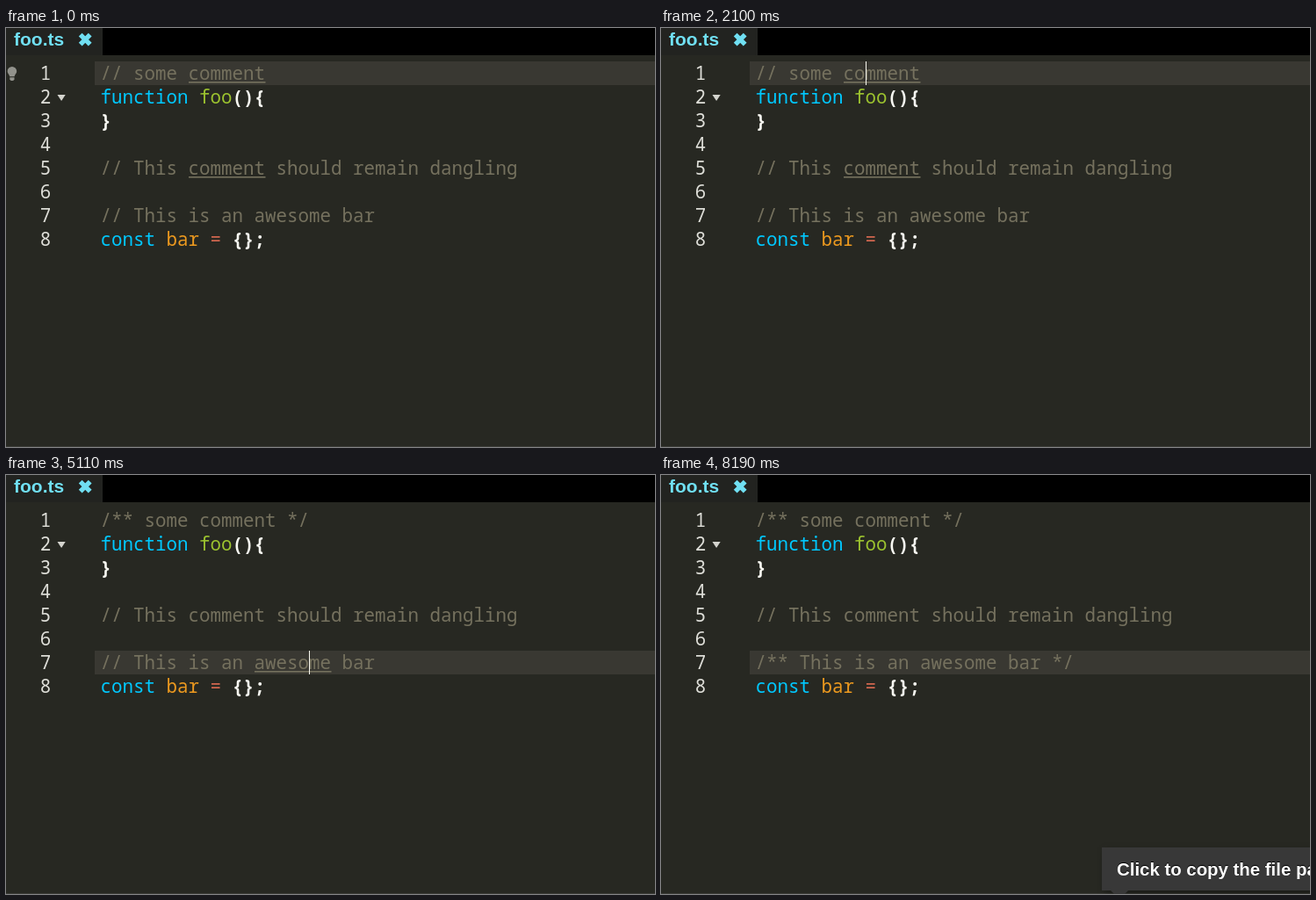
These frames come from a looping animation (739 by 477 pixels, 8.26 s). An HTML page:

```html
<!DOCTYPE html>
<html lang="en">
<head>
<meta charset="utf-8">
<title>Quick fix demo</title>
<style>
  html, body { margin: 0; width: 100%; height: 100%; overflow: hidden; background: #272822; }
  svg { display: block; width: 100%; height: 100%; }
  text { white-space: pre; }
  .mono { font: 20.83px "Noto Sans Mono", monospace; }
  .sans { font: 25.2px "Liberation Sans", Arial, sans-serif; }
</style>
</head>
<body>
<svg id="stage" viewBox="0 0 739 477"></svg>
<script>
const LOOP = 8260, TICK = 70;
const LEFT = 108, TOP = 38, ROW = 27, CHAR = 12.5;
const FIRST_EDIT = 2170, SECOND_EDIT = 5390;
const COLOR = {
  comment: '#75715e', keyword: '#00c8ff', name: '#9cc32f',
  plain: '#f8f8f2', variable: '#ec991f', operator: '#d0664f', tab: '#70dff2'
};

// Spans are [start, end) in milliseconds.
const modalSpans = [[1400, 2100], [4340, 5110]];
const unsavedSpans = [[FIRST_EDIT, 3920], [SECOND_EDIT, 7210]];
const caretSpans = [[70, 560], [1050, 1400], [2100, 2590], [2730, 3990],
                    [5110, 5880], [6300, 6790], [7280, 7770]];
const hoverSpan = [6580, 7420];

// [time, row, column]
const caretMoves = [[0, 1, 10], [FIRST_EDIT, 1, 19], [2730, 2, 15], [2870, 3, 1], [3010, 4, 0],
                    [3150, 5, 19], [3290, 6, 0], [3500, 7, 19], [SECOND_EDIT, 7, 29]];
// [start, end, row, column, length]
const underlines = [[0, FIRST_EDIT, 1, 8, 7], [0, FIRST_EDIT, 5, 8, 7],
                    [3220, 3360, 5, 16, 6], [3570, SECOND_EDIT, 7, 14, 7]];
// [start, end, row]
const bulbs = [[0, 2100, 1], [2170, 2310, 1], [3710, 5110, 7], [5390, 5600, 7]];

const within = (t, [start, end]) => t >= start && t < end;
const find = (t, spans) => spans.find(span => within(t, span));
const progress = (t, start, end) => Math.min(1, Math.max(0, (t - start) / (end - start)));
const ease = p => p * p * (3 - 2 * p);
const rowTop = row => TOP + (row - 1) * ROW;

const rect = (x, y, w, h, fill, extra = '') =>
  `<rect x="${x}" y="${y}" width="${w}" height="${h}" fill="${fill}" ${extra}/>`;
const label = (type, x, y, fill, content, style = '') =>
  `<text class="${type}" x="${x}" y="${y}" fill="${fill}" style="${style}">${content}</text>`;
const path = (d, attributes) => `<path d="${d}" ${attributes}/>`;

function bulb(x, y, scale, fill) {
  return `<g transform="translate(${x} ${y}) scale(${scale})" fill="${fill}">` +
    path('M5.5 0a5.3 5.3 0 0 1 5.3 5.3c0 2.6-2.3 3.6-2.6 6H2.8c-.3-2.4-2.6-3.4-2.6-6A5.3 5.3 0 0 1 5.5 0z', '') +
    path('M2.9 12.2h5.2v2.2L6.8 16H4.2L2.9 14.4z', '') + '</g>';
}

function codeLines(t) {
  const comment = (body, isBlock) => [['comment', isBlock ? `/** ${body} */` : `// ${body}`]];
  return [
    comment('some comment', t >= FIRST_EDIT),
    [['keyword', 'function '], ['name', 'foo'], ['plain', '(){']],
    [['plain', '}']],
    [],
    comment('This comment should remain dangling', false),
    [],
    comment('This is an awesome bar', t >= SECOND_EDIT),
    [['keyword', 'const '], ['variable', 'bar '], ['operator', '= '], ['plain', '{};']]
  ];
}

function tabBar(t) {
  const icon = find(t, unsavedSpans)
    ? `<circle cx="91" cy="12.5" r="9.5" fill="${COLOR.tab}"/>`
    : path('M84.7 7.6l11 11m0-11l-11 11', `stroke="${COLOR.tab}" stroke-width="5.4"`);
  return rect(0, 0, 739, 31, '#000') + rect(0, 0, 110, 31, '#222320') +
    label('sans', 9, 20, COLOR.tab, 'foo.ts', 'font-size:21px;font-weight:bold') + icon;
}

function editor(t) {
  const [, row, column] = caretMoves.findLast(([time]) => t >= time);
  let out = rect(0, 0, 739, 477, '#272822') + rect(0, 476, 739, 1, '#3a3b36') +
    rect(101, rowTop(row), 638, ROW, '#393832');

  codeLines(t).forEach((tokens, i) => {
    const baseline = rowTop(i + 1) + 21;
    const spans = tokens.map(([kind, content]) =>
      `<tspan fill="${COLOR[kind]}" font-weight="${kind === 'plain' ? 600 : 400}">${content}</tspan>`);
    out += label('mono', 38.7, baseline, '#deded8', i + 1, 'font-weight:500') +
      label('mono', LEFT - 0.5, baseline, COLOR.plain, spans.join(''));
  });
  out += path('M58.5 76h9.2l-4.6 7z', 'fill="#d4d4ce"');

  for (const mark of underlines) {
    if (!within(t, mark)) continue;
    const [, , markRow, start, length] = mark;
    out += rect(LEFT + start * CHAR, rowTop(markRow) + 23, length * CHAR, 1.6, COLOR.comment);
  }
  const hint = find(t, bulbs);
  if (hint) out += bulb(1.4, rowTop(hint[2]) + 6, 1, '#92928c');
  if (find(t, caretSpans)) out += rect(Math.floor(LEFT + column * CHAR), rowTop(row), 1, ROW, '#f8f8f0');
  return out + tabBar(t);
}

function keyCap(x, width, name) {
  return rect(x, 98.5, width, 36, '#111', 'rx="6.5" stroke="#808080" stroke-width="3"') +
    label('mono', x + 7.5, 125, '#858585', name, 'font-size:22.9px');
}

function modal(elapsed) {
  return rect(0, 0, 739, 477, '#fff', 'opacity=".75"') +
    rect(63, 67, 605, 383, '#323433', 'rx="6"') +
    keyCap(301.5, 59, 'Esc') + label('sans', 368.5, 125, '#808080', 'to exit') +
    keyCap(444.5, 86, 'Enter') + label('sans', 539, 125, '#808080', 'to select') +
    bulb(102.6, 146, 1.8, '#fff') +
    label('sans', 134, 169, '#fff', 'Quick Fixes', 'font-size:28px;font-weight:bold') +
    rect(98.5, 220.5, 534, 44, '#323433', 'stroke="#1b6792" stroke-width="6"') +
    rect(99, 221, 533, 43, 'none', 'stroke="#0797e4" stroke-width="4.4"') +
    label('sans', 104.5, 252, '#a2a2a2', 'Filter', 'font-size:28px') +
    (elapsed < 490 ? rect(105, 227, 1, 32, '#fff') : '') +
    rect(98, 272, 535, 55, '#555') +
    label('mono', 111.5, 307, '#fff', 'Convert comment to block', 'font-weight:600');
}

function hoverCard() {
  return rect(215.5, 169.5, 306, 67, '#343336', 'rx="4" stroke="#fff" stroke-width="3"') +
    label('mono', 228, 197, '#dcdcdc', 'const bar: {}', 'font-size:21.3px;font-weight:700') +
    label('mono', 228, 224, '#dcdcdc', 'This is an awesome bar', 'font-size:21.3px;font-style:italic');
}

function pointer(t) {
  if (!within(t, [5880, 7700])) return '';
  const arrive = ease(progress(t, 5810, 6510)), leave = ease(progress(t, 7280, 7700));
  const x = 595 - 394 * arrive + 534 * leave;
  const y = 470 - 222 * arrive + 229 * leave;
  return path(`M${x - 3} ${y - 7}h2.5l.5 .7l.5 -.7h2.5M${x} ${y - 7}v14M${x - 3} ${y + 7}h2.5l.5 -.7l.5 .7h2.5`,
    'fill="none" stroke="#0c0c0a" stroke-width="1"');
}

function copyHint(t) {
  const shown = progress(t, 7910, 8190);
  if (!shown) return '';
  return `<g opacity="${shown}" transform="translate(0 ${8 * (1 - ease(shown))})">` +
    rect(502, 424, 260, 49, '#383838', 'style="filter:drop-shadow(4px 4px 5px #0005)"') +
    path('M512 473h20l-10 10z', 'fill="#383838"') +
    label('sans', 519, 456, '#fff', 'Click to copy the file path',
      'font-size:20.4px;font-weight:bold;text-shadow:0 -1px 0 #000') + '</g>';
}

function scene(t) {
  const open = find(t, modalSpans);
  return editor(t) +
    (open ? modal(t - open[0]) : '') +
    (within(t, hoverSpan) ? hoverCard() : '') +
    pointer(t) + copyHint(t);
}

const stage = document.getElementById('stage');
const startTime = performance.now();
let lastTick = -1;

function draw() {
  const elapsed = (performance.now() - startTime) % LOOP;
  const t = Math.floor(elapsed / TICK) * TICK;
  if (t !== lastTick) {
    stage.innerHTML = scene(t);
    lastTick = t;
  }
  requestAnimationFrame(draw);
}
draw();
</script>
</body>
</html>
```
